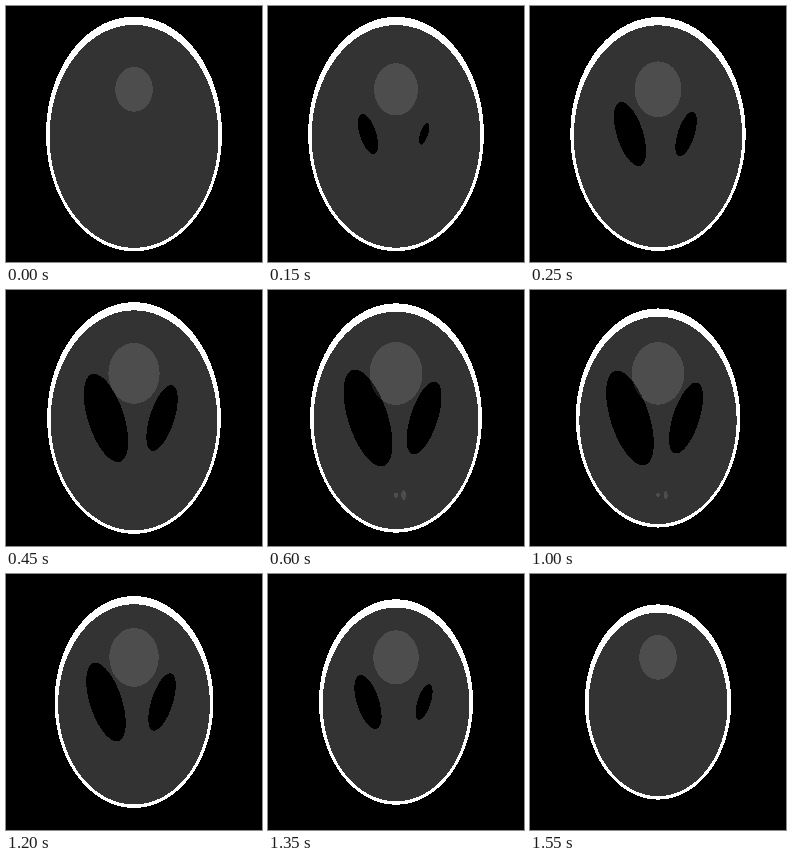
Recreate the animation shown at these times as an HTML page with a canvas. Size 256x256 px, loop 1600 ms.

```html
<!DOCTYPE html>
<html lang="en">
<head>
<meta charset="utf-8">
<title>Slices through a 3D phantom</title>
<style>
  html, body { margin: 0; height: 100%; overflow: hidden; background: #000; }
  canvas { display: block; width: 100%; height: 100%; image-rendering: pixelated; }
</style>
</head>
<body>
<canvas id="stage" width="256" height="256"></canvas>
<script>
const SIZE = 256, SLICES = 32, SLICE_MS = 50, DEPTH = 0.5;
const MIDDLE = DEPTH / 2;

const ctx = document.getElementById('stage').getContext('2d');
const image = ctx.createImageData(SIZE, SIZE);
const density = new Float32Array(SIZE * SIZE);
const toUnit = i => 2 * i / (SIZE - 1) - 1;

// Adds the cross-section at depth z of an ellipsoid with semi-axes a, b, c
function addEllipsoid(z, value, { a, b, c, x = 0, y = 0, centre = MIDDLE, tilt = 0 }) {
  const room = 1 - ((z - centre) / c) ** 2;
  if (room <= 0) return;
  const cos = Math.cos(tilt), sin = Math.sin(tilt);
  for (let row = 0; row < SIZE; row++) {
    const dy = -toUnit(row) - y;
    for (let col = 0; col < SIZE; col++) {
      const dx = toUnit(col) - x;
      const u = (dx * cos + dy * sin) / a;
      const v = (dy * cos - dx * sin) / b;
      if (u * u + v * v <= room) density[row * SIZE + col] += value;
    }
  }
}

function addHead(z) {
  const add = (value, shape) => addEllipsoid(z, value, shape);

  // Skull and brain
  add(1, { a: 0.69, b: 0.92, c: 0.9, centre: 0 });
  add(-0.8, { a: 0.6624, b: 0.874, c: 0.88, y: -0.0184, centre: 0 });

  // Ventricles: mirrored, the left one larger
  for (const side of [-1, 1]) {
    add(-0.2, {
      a: 0.135 - side * 0.025,
      b: 0.36 - side * 0.05,
      c: 0.215 - side * 0.005,
      x: side * 0.22,
      tilt: -side * Math.PI / 10,
    });
  }

  // Large bright region
  add(0.1, { a: 0.21, b: 0.25, c: 0.35, y: 0.35 });

  // Small spots
  const wide = 0.046, narrow = wide / 2, flat = 0.02, deep = 0.1, low = -0.605;
  add(0.1, { a: wide, b: wide, c: wide, y: 0.1 });
  add(0.1, { a: wide, b: wide, c: flat, y: -0.1 });
  add(0.1, { a: wide, b: narrow, c: flat, x: -0.08, y: low });
  add(0.1, { a: narrow, b: narrow, c: deep, y: low });
  add(0.1, { a: narrow, b: wide, c: deep, x: 0.06, y: low });
}

function drawSlice(index) {
  density.fill(0);
  addHead(DEPTH * index / (SLICES - 1));
  density.forEach((value, i) => {
    image.data.fill(value * 255, i * 4, i * 4 + 3);
    image.data[i * 4 + 3] = 255;
  });
  ctx.putImageData(image, 0, 0);
}

let shown = -1;
function tick() {
  const index = Math.floor(performance.now() / SLICE_MS) % SLICES;
  if (index !== shown) drawSlice(shown = index);
  requestAnimationFrame(tick);
}
tick();
</script>
</body>
</html>
```
